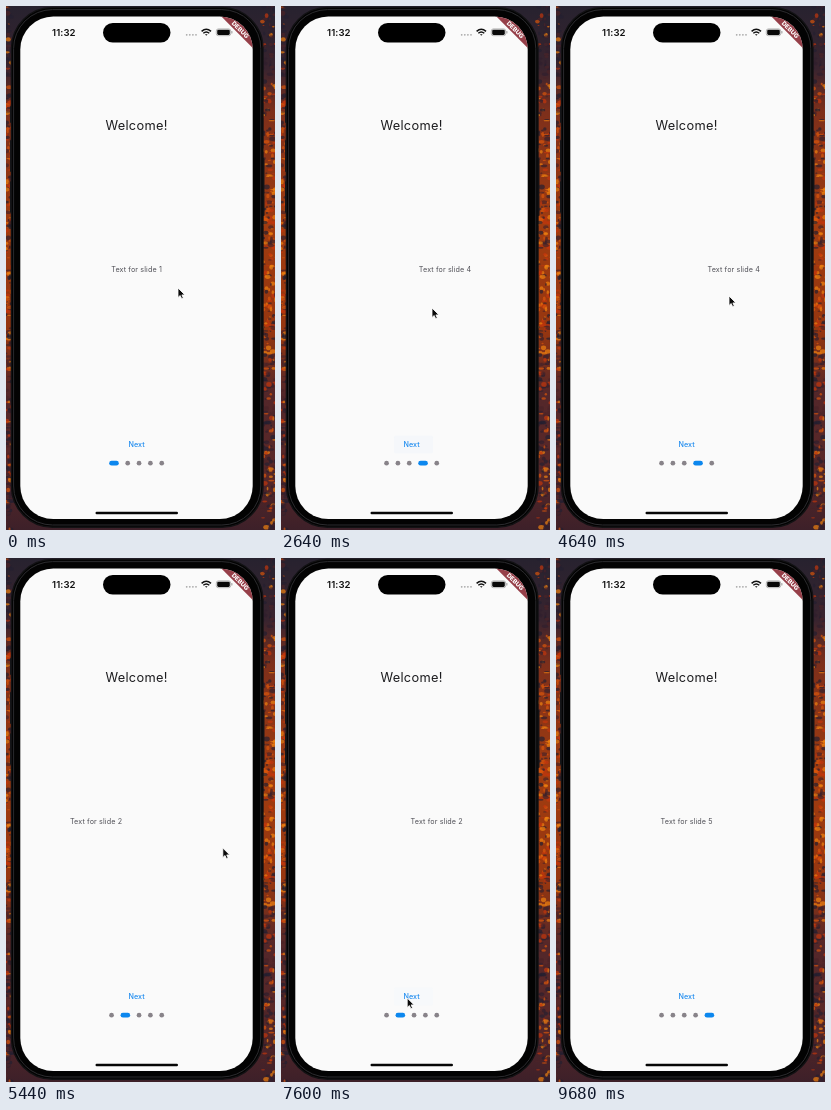
An HTML page that plays this animation: 269x524 px, repeating every 9760 ms.

```html
<!DOCTYPE html>
<html lang="en">
<head>
<meta charset="utf-8">
<title>Onboarding slides</title>
<style>
  html, body { margin: 0; width: 100%; height: 100%; overflow: hidden; background: #211c29; }
  svg { display: block; width: 269px; height: 524px; }
  text { font-family: Inter, "Open Sans", sans-serif; }
  .mid { text-anchor: middle; }
  .slide { font-size: 7.2px; letter-spacing: .12px; fill: #505057; }
</style>
</head>
<body>
<svg viewBox="0 0 269 524" xmlns="http://www.w3.org/2000/svg">
  <defs>
    <linearGradient id="lava" x2="0" y2="1">
      <stop offset="0" stop-color="#27222f"/>
      <stop offset=".12" stop-color="#39242f"/>
      <stop offset=".2" stop-color="#7d2f1b"/>
      <stop offset=".42" stop-color="#a03c10"/>
      <stop offset=".62" stop-color="#963610"/>
      <stop offset=".74" stop-color="#53272a"/>
      <stop offset=".88" stop-color="#5a2828"/>
      <stop offset="1" stop-color="#3d2029"/>
    </linearGradient>
    <clipPath id="screen"><rect x="14.3" y="10.5" width="232.4" height="502.6" rx="33"/></clipPath>
  </defs>

  <rect width="269" height="524" fill="url(#lava)"/>
  <g id="rocks"></g>

  <g fill="#17171a">
    <rect x="4" y="100" width="3" height="17" rx="1"/>
    <rect x="4" y="134" width="3" height="32" rx="1"/>
    <rect x="4" y="175" width="3" height="32" rx="1"/>
    <rect x="255" y="152" width="3.5" height="58" rx="1"/>
  </g>
  <rect x="5.4" y="1.4" width="251.6" height="519.8" rx="41" fill="#030303" stroke="#121214" stroke-width="1.4"/>
  <rect x="7.6" y="3.6" width="247.2" height="515.4" rx="39" fill="none" stroke="#2b2b2e"/>

  <g clip-path="url(#screen)">
    <rect x="14" y="10" width="233" height="504" fill="#fafafa"/>
    <text class="mid" x="130.6" y="124" font-size="12.8" letter-spacing=".3" fill="#1c1c1f">Welcome!</text>
    <g id="slides"></g>
    <rect id="glow" x="113" y="429.5" width="39" height="18" rx="2" fill="#f2f6fa"/>
    <text class="mid" x="130.6" y="441" font-size="7.2" letter-spacing=".08" font-weight="500" fill="#1d8bef">Next</text>
    <g id="dots"></g>

    <text x="46" y="30" font-size="9.6" letter-spacing=".08" font-weight="600" fill="#111">11:32</text>
    <rect x="97" y="17" width="67.5" height="19.5" rx="9.75" fill="#000"/>
    <g fill="#aaa">
      <circle cx="180.7" cy="28.8" r=".9"/><circle cx="183.8" cy="28.8" r=".9"/>
      <circle cx="186.9" cy="28.8" r=".9"/><circle cx="190" cy="28.8" r=".9"/>
    </g>
    <g fill="none" stroke="#111" stroke-width="1.5">
      <path d="M195.6 25.4Q200.3 21 205 25.4M197.3 27.3Q200.3 24.6 203.3 27.3"/>
      <path d="M199 28.3h2.6L200.3 29.8Z" fill="#111" stroke="none"/>
    </g>
    <rect x="210.3" y="22.9" width="14.4" height="6.8" rx="2.1" fill="none" stroke="#999" stroke-width=".7"/>
    <rect x="211.2" y="23.7" width="12.6" height="5.2" rx="1.3" fill="#080808"/>
    <rect x="225.4" y="25.1" width="1" height="2.4" rx=".5" fill="#999"/>

    <g transform="translate(234.4 23.6) rotate(45)">
      <rect x="-30" y="-7" width="60" height="11.2" fill="#963f49"/>
      <text class="mid" y="2.3" font-size="6.2" font-weight="800" fill="#fff">DEBUG</text>
    </g>
    <rect x="89.5" y="505.8" width="82.5" height="2.4" rx="1.2" fill="#050505"/>
  </g>

  <path id="cursor" d="M0 0V9.5L2.2 7.5L3.7 10.8L5.3 10.1L3.9 6.9H6.9Z"
    fill="#0a0a0a" stroke="#fff" stroke-width=".8" stroke-linejoin="round"/>
</svg>

<script>
const LOOP = 9760, STEP = 80, PAGE_W = 232, COUNT = 5;
const $ = id => document.getElementById(id);

function add(parent, tag, attrs, text = '') {
  const el = document.createElementNS('http://www.w3.org/2000/svg', tag);
  for (const k in attrs) el.setAttribute(k, attrs[k]);
  el.textContent = text;
  parent.append(el);
  return el;
}

// Easings
const linear = u => u;
const smooth = u => u * u * (3 - 2 * u);
const settle = u => 1 - (1 - u) ** 3;
const bez = (a, b, s) => 3 * a * s * (1 - s) ** 2 + 3 * b * s * s * (1 - s) + s ** 3;
function ease(u) {
  let lo = 0, hi = 1;
  for (let i = 0; i < 18; i++) {
    const m = (lo + hi) / 2;
    if (bez(.25, .25, m) < u) lo = m; else hi = m;
  }
  return bez(.1, 1, lo);
}

// Value of a track of [time, value, easing into it]
function at(track, t) {
  const i = track.findIndex(k => k[0] > t);
  if (i < 0) return track[track.length - 1][1];
  if (i === 0) return track[0][1];
  const [t0, v0] = track[i - 1], [t1, v1, fn = linear] = track[i];
  return v0 + (v1 - v0) * fn((t - t0) / (t1 - t0));
}

// Button presses: [time, page before]
const clicks = [[1360, 1], [2360, 2], [7295, 0], [7900, 1], [8420, 2], [8940, 3]];
const pages = [
  [160, 0], [400, .33], [800, 1, settle],
  [2960, 3], [3200, 3.41], [3560, 4, settle],
  [3680, 4], [3920, 3.59], [4300, 3, settle],
  [4400, 3], [4640, 2.797], [4720, 2.68], [5060, 2, settle],
  [5120, 2], [5320, 1.59], [5680, 1, settle],
  [5720, 1], [5960, .5], [6440, 0, settle],
  ...clicks.flatMap(([t, p]) => [[t, p], [t + 500, p + 1, ease]])
].sort((a, b) => a[0] - b[0]);

const path = [
  [0, 172, 282], [160, 172, 286], [400, 95, 286], [640, 95, 290, smooth],
  [1040, 136, 417, smooth], [1200, 131, 437], [2360, 131, 437],
  [2640, 151, 302], [2960, 185, 290, settle], [3200, 90, 290], [3680, 90, 292],
  [3920, 185, 291], [4160, 180, 290], [4400, 126, 290, smooth],
  [4640, 173, 290], [4720, 200, 290], [4800, 205, 290], [5120, 120, 290, smooth],
  [5320, 215, 290], [5420, 218, 290], [5720, 126, 290, smooth],
  [5960, 242, 294], [6080, 285, 300], [6800, 285, 380],
  [7200, 126, 440, smooth], [9120, 127, 440], [9440, 285, 430, smooth]
];
const cursorX = path.map(([t, x, , fn]) => [t, x, fn]);
const cursorY = path.map(([t, , y, fn]) => [t, y, fn]);

// Lava rock texture
let seed = 7;
const rnd = () => (seed = seed * 16807 % 2147483647) / 2147483647;
const HOT = ['#d9550c', '#c2360d', '#f0820f'], COLD = ['#30202e', '#4a2428', '#231f31'];
for (let i = 0; i < 620; i++) {
  const y = rnd() * 524, right = rnd() < .65;
  const heat = y < 75 ? .12 : y < 370 ? .58 : .28;
  const tones = rnd() < heat ? HOT : COLD;
  add($('rocks'), 'ellipse', {
    cx: right ? 256 + rnd() * 14 : rnd() * 6, cy: y,
    rx: .8 + rnd() * 2.6, ry: .5 + rnd() * 2,
    fill: tones[Math.floor(rnd() * 3)], opacity: .7
  });
}

const list = [...Array(COUNT).keys()];
const slides = list.map(i => add($('slides'), 'text', { class: 'mid slide', y: 265.5 }, `Text for slide ${i + 1}`));
const dots = list.map(() => add($('dots'), 'rect', { y: 454.8, height: 4.7, rx: 2.35 }));

function draw(t) {
  const page = at(pages, t), active = Math.round(page);
  slides.forEach((el, i) => el.setAttribute('x', 130.6 + (i - page) * PAGE_W));
  dots.forEach((el, i) => {
    const on = i === active;
    el.setAttribute('x', 103.2 + i * 11.35 + (i > active ? 4.8 : 0));
    el.setAttribute('width', on ? 9.6 : 4.7);
    el.setAttribute('fill', on ? '#0c87ee' : '#888389');
  });
  const press = clicks.find(([c]) => t >= c && t < c + 400);
  $('glow').setAttribute('opacity', press ? Math.min(1, (press[0] + 400 - t) / 200) : 0);
  $('cursor').setAttribute('transform', `translate(${at(cursorX, t)} ${at(cursorY, t)})`);
}

function tick() {
  draw(Math.floor(performance.now() % LOOP / STEP) * STEP);
  requestAnimationFrame(tick);
}
tick();
</script>
</body>
</html>
```
